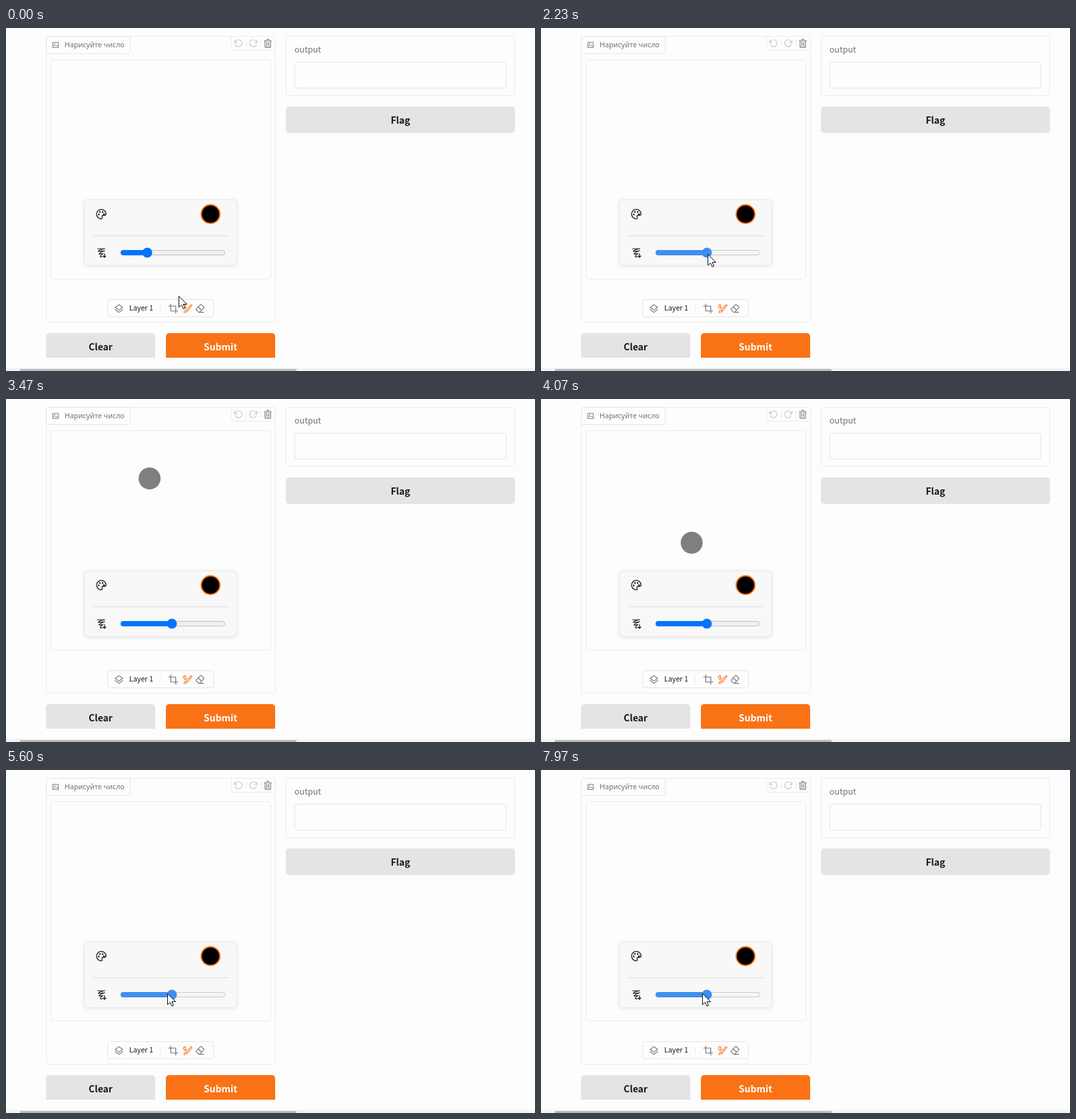
Recreate the animation shown at these times as an HTML page with a canvas. Size 794x516 px, loop 8000 ms.

```html
<!DOCTYPE html>
<html lang="ru">
<head>
<meta charset="utf-8">
<title>Sketch pad</title>
<style>
html, body { margin: 0; width: 100%; height: 100%; overflow: hidden; background: #fdfdfd; }
canvas { display: block; width: 794px; height: 516px; }
</style>
</head>
<body>
<canvas id="stage"></canvas>
<script>
const W = 794, H = 516, LOOP = 8000;
const canvas = document.getElementById('stage');
const ratio = window.devicePixelRatio || 1;
canvas.width = W * ratio;
canvas.height = H * ratio;
const ctx = canvas.getContext('2d');

const LATIN = '"Noto Sans CJK SC", "Noto Sans CJK JP", "Noto Sans CJK", "Noto Sans", sans-serif';
const CYRILLIC = '"Noto Sans", "Open Sans", sans-serif';
const PAGE = '#fdfdfd', LINE = '#e4e4e6', PALE = '#ebebed', BUTTON = '#e4e4e7';
const ORANGE = '#f97316', INK = '#18181b', GREY = '#71717a';

// Pointer path: time, x, y
const pointerKeys = [
  [0, 259, 403], [150, 259, 403], [830, 214, 340], [1130, 215, 340],
  [1350, 215, 340], [2150, 250, 340], [2530, 250, 340], [3200, 221, 136],
  [3470, 215, 119], [3700, 215, 119], [4500, 239, 336], [4760, 239, 336],
  [5000, 242, 336], [LOOP, 242, 336]
];
const thumbKeys = [[0, 212], [1350, 212], [2150, 249], [LOOP, 249]];
const presses = [[1000, 2450], [5030, LOOP]];

const icons = {
  picture: 'M3 3h18v18H3zM3 18l6-6 4 4 3-3 5 5M8 7.5h1.5V9H8z',
  undo: 'M2 4v6h6M3.5 15a9 9 0 1 0 2.1-9.4L2 10',
  redo: 'M22 4v6h-6M20.5 15a9 9 0 1 1-2.1-9.4L22 10',
  trash: 'M3 5.5h18M9 2h6M5 5.5V22h14V5.5M9.7 9.5v8.5M14.3 9.5v8.5',
  layers: 'M12 2l9.5 7L12 16 2.5 9zM2.5 14.5L12 22l9.5-7.5',
  crop: 'M6 1v17h17M1 6h17v17',
  brush: 'M8 16L19.5 3.5q3-2 3 1.5L11 18.500zM8 16q-4 0-4.500 6 5.500 0 7.500-3.500M2 9q0-6 3.500-6t1 5-1 4 4.500-3',
  eraser: 'M21 21H9l-5.5-5.5q-1.5-1.5 0-3L13 3q1.5-1.5 3 0l5 5q1.5 1.5 0 3L11 21M8 8l8 8',
  palette: 'M12 2a10 10 0 1 0 0 20c3 0 2-3 1.5-4.5s.5-3 2.5-3h3c2 0 3-1 3-3C22 6 17.5 2 12 2z',
  scribble: 'M3 3q8 1 16 0Q8 5 4.500 9q8 0 14.500-1.500Q10 10 6 15q5 0 9-1-5 3-6 7 2 1 5 0M18.500 14v8.500M15.500 19.500l3 3 3-3'
};
for (const name in icons) icons[name] = new Path2D(icons[name]);
const arrow = new Path2D('M0 0V16.5L3.9 12.9 6.5 18.8 9 17.7 6.5 12H12z');

function track(keys, t) {
  let i = 1;
  while (i < keys.length - 1 && t > keys[i][0]) i++;
  const a = keys[i - 1], b = keys[i];
  const p = Math.min(1, (t - a[0]) / (b[0] - a[0]));
  const e = p * p * (3 - 2 * p);
  return a.slice(1).map((v, k) => v + (b[k + 1] - v) * e);
}

function box(x, y, w, h, r, fill, stroke) {
  ctx.beginPath();
  ctx.roundRect(x, y, w, h, r);
  if (fill) { ctx.fillStyle = fill; ctx.fill(); }
  if (stroke) { ctx.strokeStyle = stroke; ctx.lineWidth = 1; ctx.stroke(); }
}

function rect(x, y, w, h, color) {
  ctx.fillStyle = color;
  ctx.fillRect(x, y, w, h);
}

function disc(x, y, r, color) {
  ctx.fillStyle = color;
  ctx.beginPath();
  ctx.arc(x, y, r, 0, 7);
  ctx.fill();
}

function text(str, x, y, size, color, { family = LATIN, weight = 400, align = 'left' } = {}) {
  ctx.font = `${weight} ${size}px ${family}`;
  ctx.textAlign = align;
  ctx.fillStyle = color;
  ctx.fillText(str, x, y);
}

function icon(name, x, y, size, color, weight = 1.1) {
  const k = size / 24;
  ctx.save();
  ctx.translate(x - size / 2, y - size / 2);
  ctx.scale(k, k);
  ctx.lineWidth = weight / k;
  ctx.lineJoin = ctx.lineCap = 'round';
  ctx.strokeStyle = color;
  ctx.stroke(icons[name]);
  ctx.restore();
}

function button(label, x, y, w, h, r, fill, color) {
  box(x, y, w, h, r, fill);
  text(label, x + w / 2, y + 26, 14, color, { weight: 600, align: 'center' });
}

function drawEditor() {
  box(60.5, 12.5, 344, 430, 3, null, PALE);
  box(67.5, 47.5, 330, 330, 4, null, PALE);

  box(60.5, 12.5, 126, 26, [3, 0, 4, 0], PAGE, LINE);
  icon('picture', 74.5, 25.5, 10.5, GREY, 0.9);
  text('Нарисуйте число', 88, 29, 10.7, GREY, { family: CYRILLIC });

  box(338.5, 12.5, 66, 21, [0, 3, 0, 4], PAGE, PALE);
  icon('undo', 349, 23, 14, '#c6c6ca');
  icon('redo', 371, 23, 14, '#c6c6ca');
  icon('trash', 393, 23, 14, GREY);
  rect(360, 18, 1, 10, PALE);
  rect(382, 18, 1, 10, PALE);

  box(152.5, 408.5, 159, 26, 3, PAGE, LINE);
  icon('layers', 169.5, 422, 14, GREY);
  text('Layer 1', 185, 425, 10.74, INK);
  rect(231, 416, 1, 11, PALE);
  icon('crop', 251, 422, 15, GREY, 1.2);
  icon('brush', 272.5, 422, 15, ORANGE);
  icon('eraser', 291, 422, 15, GREY);
}

function drawPanel() {
  ctx.save();
  ctx.shadowColor = 'rgba(0,0,0,.1)';
  ctx.shadowBlur = 6 * ratio;
  ctx.shadowOffsetY = ratio;
  box(117.5, 258.5, 229, 99, 5, '#f8f8f8');
  ctx.restore();
  box(117.5, 258.5, 229, 99, 5, null, '#e8e8ea');
  rect(131, 312, 203, 1, '#dedee1');

  icon('palette', 143, 280, 17, INK, 1.3);
  disc(139.2, 280.5, 1.2, INK);
  disc(141, 276.8, 1.2, INK);
  disc(145, 276.8, 1.2, INK);
  disc(147, 280, 1.2, INK);
  icon('scribble', 143.5, 338, 16, INK, 1.2);
  disc(307, 280, 15, ORANGE);
  disc(307, 280, 13, '#000');
}

function drawSlider(thumb, state) {
  const [fill, knob, groove, edge] = {
    idle: ['#0075ff', '#0075ff', '#efefef', '#c2c2c2'],
    hover: ['#0054bc', '#0075ff', '#e5e5e5', '#b2b2b2'],
    active: ['#3f8fee', '#3b8ef2', '#f5f5f5', '#cbcbcb']
  }[state];
  box(172.5, 334.5, 156, 7, 3.5, groove, edge);
  box(172, 334, thumb - 172, 8, [4, 0, 0, 4], fill);
  disc(thumb, 338, 7.5, knob);
}

function drawActions() {
  button('Clear', 60, 459, 164, 37, [5, 5, 0, 0], BUTTON, INK);
  button('Submit', 240, 459, 164, 37, [5, 5, 0, 0], ORANGE, '#fff');
  button('Flag', 420, 118, 344, 40, 5, BUTTON, INK);
}

function drawOutput() {
  box(420.5, 12.5, 343, 89, 3, null, PALE);
  text('output', 433, 37, 12.53, GREY);
  box(433.5, 51.5, 317, 39, 4, null, LINE);
}

function drawScrollbar() {
  rect(0, 511, W, 5, '#f3f3f3');
  rect(21, 513, 415, 3, '#b9b9b9');
}

function inside(x, y, left, top, right, bottom) {
  return x > left && x < right && y > top && y < bottom;
}

function drawPointer(x, y, thumb) {
  const onPaper = inside(x, y, 68, 48, 398, 378) && !inside(x, y, 117, 258, 347, 358);
  if (onPaper) {
    disc(x + 0.5, y + 0.5, 16.5 * (thumb - 180) / 69, '#7f7f7f');
    return;
  }
  ctx.save();
  ctx.translate(x + 0.5, y + 0.5);
  ctx.fillStyle = '#fff';
  ctx.strokeStyle = '#101014';
  ctx.lineWidth = 1;
  ctx.fill(arrow);
  ctx.stroke(arrow);
  ctx.restore();
}

function draw(t) {
  const [x, y] = track(pointerKeys, t);
  const [thumb] = track(thumbKeys, t);
  const pressed = presses.some(([a, b]) => t >= a && t < b);
  const hovered = inside(x, y, 170, 329, 331, 347);

  ctx.setTransform(ratio, 0, 0, ratio, 0, 0);
  rect(0, 0, W, H, PAGE);
  drawEditor();
  drawPanel();
  drawSlider(thumb, pressed ? 'active' : hovered ? 'hover' : 'idle');
  drawActions();
  drawOutput();
  drawScrollbar();
  drawPointer(x, y, thumb);
}

const start = performance.now();
function frame() {
  draw((performance.now() - start) % LOOP);
  requestAnimationFrame(frame);
}
frame();
</script>
</body>
</html>
```
